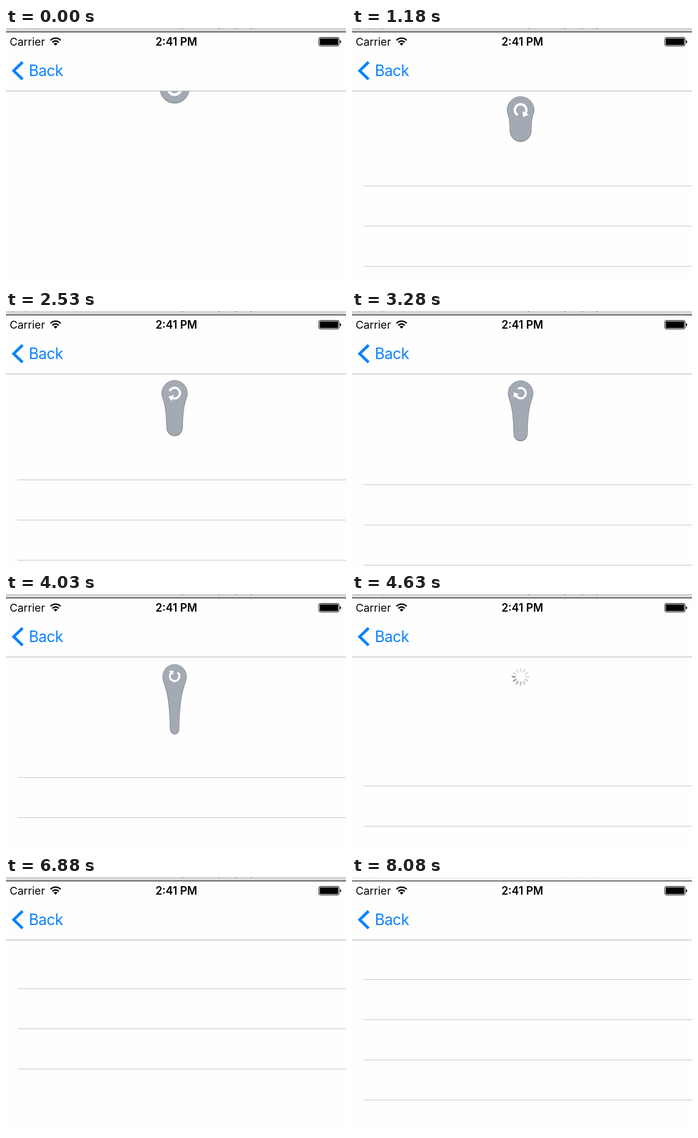
An HTML page for the animation above (8180 ms loop, 559 by 419 pixels).

```html
<!DOCTYPE html>
<html lang="en">
<head>
<meta charset="utf-8">
<title>Pull to refresh</title>
<style>
html, body { margin: 0; height: 100%; overflow: hidden; background: #fefefe; }
svg { display: block; font-family: Inter, Roboto, sans-serif; }
#drop { filter: drop-shadow(0 1px .7px rgba(0, 0, 0, .4)); }
#body { fill: #a3aab4; stroke: rgba(85, 85, 85, .5); stroke-width: .75; }
#titlebar { fill: #d6d6d6; }
#title { fill: #777; }
.inactive #titlebar { fill: #f6f6f6; }
.inactive #title { fill: #bbb; }
.inactive #lights circle { fill: #dcdcdc; }
</style>
</head>
<body>
<svg id="stage" width="559" height="419" viewBox="0 0 559 419">
  <rect width="559" height="419" fill="#fefefe"/>
  <g id="rows" fill="#c8c8ca"></g>
  <g id="drop"><path id="body"/><path id="arrow" fill="#fff"/></g>
  <g id="spinner" stroke-width="2.9" stroke-linecap="round"></g>

  <rect y="7" width="559" height="96" fill="#fefefe"/>
  <rect y="103" width="559" height="1" fill="#b4b4b4"/>
  <rect id="titlebar" width="559" height="6"/>
  <g id="lights">
    <circle cx="11" cy="-5" r="6" fill="#b9b3b3"/>
    <circle cx="31" cy="-5" r="6" fill="#e9b64c"/>
    <circle cx="51" cy="-5" r="6" fill="#b5b5b5"/>
  </g>
  <path id="title" d="M289 0h2v1h-2zM349 0h2v1h-2zM378 0h2v1h-2zM402 0h2v1h-2z"/>
  <rect y="6" width="559" height="1"/>

  <text x="6" y="28.5" font-size="17.8">Carrier</text>
  <text x="280" y="28.5" font-size="18" font-weight="600" text-anchor="middle">2:41 PM</text>
  <g fill="none" stroke="#000" stroke-width="2.4">
    <path d="M73.2 20.3A11.2 11.2 0 0 1 89.8 20.3M76.3 23.7A6.8 6.8 0 0 1 86.7 23.7"/>
  </g>
  <path d="M81.5 29L78.3 25.8A4.5 4.5 0 0 1 84.7 25.8Z"/>
  <rect x="514.5" y="15.5" width="33" height="14" rx="2.5" fill="none" stroke="#000"/>
  <rect x="516" y="17" width="30" height="11" rx="1"/>
  <path d="M549 20q2 0 2 2.5t-2 2.5z"/>
  <path d="M27.3 56L12.6 70.2L27.3 84.4" fill="none" stroke="#0b82ff" stroke-width="4.6"/>
  <text x="37.5" y="79" font-size="25" letter-spacing="-.6" fill="#0b82ff">Back</text>
</svg>
<script>
const LOOP = 8180, SCALE = 1.5, TOP = 103, CENTER = 277.2, ROW = 66;
const TRIGGER = 4400, DISMISS = 6680;
const $ = id => document.getElementById(id);
const lerp = (a, b, p) => a + (b - a) * p;
const clamp = v => Math.max(0, Math.min(1, v));

// Pull distance over time: [ms, px]
const PULL = [
  [0, 29], [150, 52], [430, 73], [880, 86], [1180, 91], [1330, 93], [1480, 93],
  [1930, 101], [2530, 109], [3280, 117], [3430, 117], [3580, 120], [4480, 145],
  [4630, 147], [4930, 147], [5080, 100], [5230, 70], [5380, 66], [6650, 66],
  [6730, 48], [6880, 15], [7030, 0], [LOOP, 0]
];

function add(parent, tag, attrs) {
  const el = document.createElementNS('http://www.w3.org/2000/svg', tag);
  for (const key in attrs) el.setAttribute(key, attrs[key]);
  return parent.appendChild(el);
}

const rows = Array.from({ length: 4 }, () =>
  add($('rows'), 'rect', { x: 19, width: 540, height: 1 }));
const spokes = Array.from({ length: 12 }, (_, i) =>
  add($('spinner'), 'path', { d: 'M0 -9.2V-13.4', transform: `rotate(${i * 30})` }));

// The picture advances every 150 ms
function quantize(t) {
  if (t < 280) return t < 150 ? 0 : 150;
  return 130 + 150 * Math.floor((t - 130) / 150);
}

function pullAt(t) {
  const i = PULL.findIndex(([end]) => end > t);
  const [t0, a] = PULL[i - 1], [t1, b] = PULL[i];
  return Math.round(lerp(a, b, (t - t0) / (t1 - t0)));
}

function visibleRows(t) {
  if (t < 150) return 0;
  if (t < 4600) return 3;
  if (t < 5230) return 2;
  return t < 7180 ? 3 : 4;
}

function drawDrop(pull) {
  const stretch = clamp((pull / SCALE - 43) / 53);
  const size = (relaxed, stretched) => SCALE * lerp(relaxed, stretched, stretch);
  const R = size(16, 12.5), r = size(16, 3);
  const bottom = TOP + pull - size(6, 4) - r;
  const top = stretch ? TOP + size(5, 9) + R : bottom;
  const x1 = lerp(R, r, .1), x2 = lerp(R, r, .9), y = lerp(top, bottom, .2);
  $('body').setAttribute('d',
    `M${R} ${top}A${R} ${R} 0 0 0 ${-R} ${top}` +
    `C${-x1} ${y} ${-x2} ${y} ${-r} ${bottom}` +
    `A${r} ${r} 0 0 0 ${r} ${bottom}` +
    `C${x2} ${y} ${x1} ${y} ${R} ${top}Z`);

  const w = size(3, 2), outer = size(7, 5) + w / 2, inner = outer - w;
  $('arrow').setAttribute('d',
    `M${outer} 0A${outer} ${outer} 0 1 1 0 ${-outer}V${-outer - w}` +
    `L${2 * w} ${w / 2 - outer}L0 ${2 * w - outer}V${-inner}` +
    `A${inner} ${inner} 0 1 0 ${inner} 0Z`);
  $('arrow').setAttribute('transform', `translate(0 ${top}) rotate(${360 * stretch})`);
  $('drop').setAttribute('transform', `translate(${CENTER} 0)`);
}

function drawSpinner(t, pull) {
  const grow = clamp((t - TRIGGER) / 150) * clamp(1 - (t - DISMISS) / 200);
  const y = TOP + Math.min(33, pull - 33);
  $('spinner').setAttribute('transform', `translate(${CENTER} ${y}) scale(${grow})`);
  $('spinner').setAttribute('opacity', grow);
  const head = Math.floor(Math.min(t, 6430) * 12 / 1000) + 2;
  spokes.forEach((spoke, i) => {
    const age = (head - i + 120) % 12;
    const alpha = lerp(.37, .12, clamp(age / 6));
    spoke.setAttribute('stroke', `rgba(0, 0, 0, ${alpha})`);
  });
}

function frame() {
  const t = quantize(performance.now() % LOOP);
  const pull = pullAt(t), count = visibleRows(t);
  rows.forEach((row, i) => {
    row.setAttribute('y', TOP - 1 + ROW * (i + 1) + pull);
    row.style.display = i < count ? '' : 'none';
  });
  $('drop').style.display = t < TRIGGER ? '' : 'none';
  drawDrop(pull);
  drawSpinner(t, pull);
  $('stage').classList.toggle('inactive', t >= 8080);
  requestAnimationFrame(frame);
}
frame();
</script>
</body>
</html>
```
